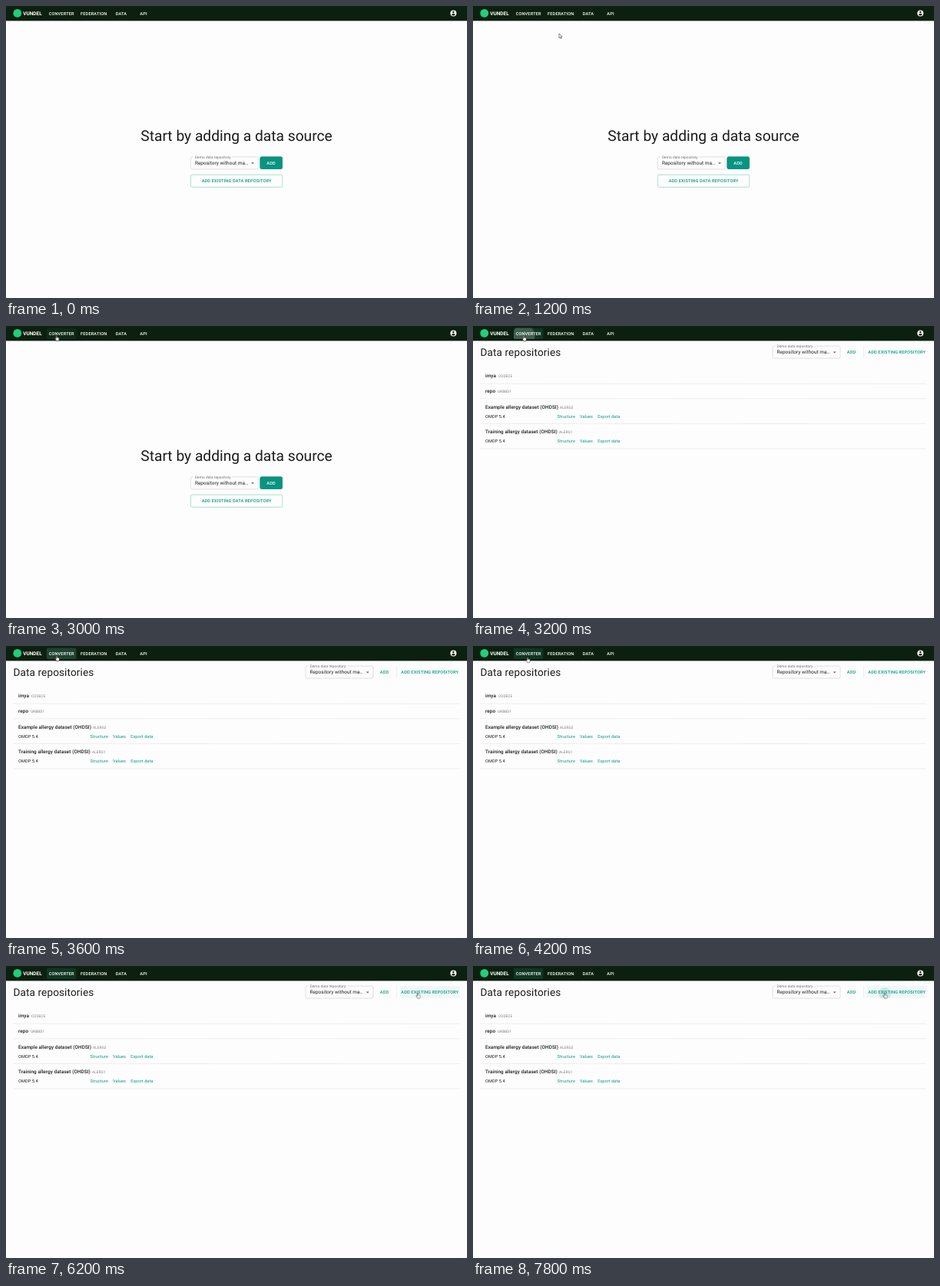
Animation, 600 px wide and 381 px high, one loop 8000 ms. Source, as an HTML page:

```html
<!DOCTYPE html>
<html lang="en">
<head>
<meta charset="utf-8">
<title>Data repositories</title>
<style>
  html, body { margin: 0; width: 100%; height: 100%; overflow: hidden; background: #fdfdfd; }
  svg { display: block; width: 100vw; height: 100vh; }
  text { font: 400 5.6px Roboto, sans-serif; fill: #1c1c1c; letter-spacing: .01071em; text-rendering: geometricPrecision; white-space: pre; }
  .btn { font-weight: 500; letter-spacing: .02857em; text-anchor: middle; }
  .white { fill: #fff; }
  .teal { fill: #079a82; }
  .brand { font-size: 6.5px; font-weight: 700; letter-spacing: 0; }
  .h3 { font-size: 19.2px; letter-spacing: 0; text-anchor: middle; }
  .h4 { font-size: 13.6px; letter-spacing: .00735em; }
  .value { font-size: 6.4px; letter-spacing: .00938em; }
  .label { font-size: 4.8px; letter-spacing: .00938em; fill: #6b6b6b; }
  .name { font-size: 6.4px; font-weight: 500; letter-spacing: .00938em; }
  .code { font-size: 4.8px; letter-spacing: 0; fill: #7c7c7c; }
  .raised { filter: drop-shadow(0 .6px .7px rgba(0, 60, 50, .45)); }
</style>
</head>
<body>
<svg viewBox="0 0 600 381" preserveAspectRatio="none">
  <defs>
    <clipPath id="navClip"><rect x="53" y="2.6" width="38.4" height="14.4" rx="1.8"/></clipPath>
    <clipPath id="addClip"><rect x="512.6" y="26" width="78.2" height="16" rx="1.8"/></clipPath>
    <g id="select">
      <path d="M244 196.9H242.3Q240.3 196.9 240.3 198.9V210.9Q240.3 212.9 242.3 212.9H326.3Q328.3 212.9 328.3 210.9V198.9Q328.3 196.9 326.3 196.9H294"
        fill="none" stroke="#c2c2c2" stroke-width=".5"/>
      <text class="label" x="245.9" y="198.6">Demo data repository</text>
      <text class="value" x="245.9" y="207.2">Repository without ma…</text>
      <path d="M319 204.2h4l-2 2z" fill="#666"/>
    </g>
  </defs>
  <rect width="600" height="381" fill="#fdfdfd"/>

  <g id="start">
    <text class="h3" x="300" y="175.7">Start by adding a data source</text>
    <use href="#select"/>
    <rect class="raised" x="330.5" y="196.6" width="29.4" height="16.4" rx="2.4" fill="#079480"/>
    <text class="btn white" x="345.1" y="207">ADD</text>
    <rect x="240.4" y="220.2" width="119.4" height="16.2" rx="2.2" fill="none" stroke="#74ccb8" stroke-width=".6"/>
    <text class="btn teal" x="300.1" y="230.3">ADD EXISTING DATA REPOSITORY</text>
  </g>

  <g id="list" opacity="0">
    <text class="h4" x="9.5" y="38.8">Data repositories</text>
    <use href="#select" x="149.6" y="-170.8"/>
    <text class="btn teal" x="492.6" y="36.1">ADD</text>
    <path d="M508.7 26v16" stroke="#dedede" stroke-width=".5"/>
    <g clip-path="url(#addClip)">
      <rect id="addHover" x="512" y="26" width="79" height="16" fill="#079480" opacity="0"/>
      <circle id="addRipple" cx="536" cy="36" r="0" fill="#079480" opacity="0"/>
    </g>
    <text class="btn teal" x="551.7" y="36.1">ADD EXISTING REPOSITORY</text>
    <g id="rows"></g>
  </g>

  <rect width="600" height="19.4" fill="#0c200f"/>
  <circle cx="14.8" cy="9.4" r="5.4" fill="#22cf78"/>
  <text class="brand white" x="22.2" y="11.8">VUNDEL</text>
  <g clip-path="url(#navClip)">
    <rect id="navHover" x="53" y="2" width="39" height="16" fill="#1e6a54" opacity="0"/>
    <circle id="navRipple" cx="66" cy="13" r="0" fill="#fff" opacity="0"/>
  </g>
  <g id="nav"></g>
  <circle cx="582.3" cy="9.6" r="4" fill="#fff"/>
  <circle cx="582.3" cy="8" r="1.2" fill="#0c200f"/>
  <path d="M579.9 11.2Q580.1 10 582.3 10T584.7 11.2Q583.9 12.5 582.3 12.5T579.9 11.2Z" fill="#0c200f"/>

  <g id="cursor" opacity="0" fill="#fff" stroke="#111" stroke-width=".5" stroke-linejoin="round">
    <path id="arrow" d="M0 0V5.8L1.4 4.6L2.3 6.6L3.2 6.2L2.3 4.2H4.1Z"/>
    <path id="hand" d="M-.6 .5Q-.6 -.1 0 -.1T.6 .5V2.4Q1.1 2 1.6 2.5Q2.2 2.2 2.6 2.8Q3.4 2.6 3.4 3.5V4.6Q3.3 5.6 2.8 6.2V6.8H-.2V6.2Q-1 5.2 -2 3.8Q-2 3 -1.2 3.3L-.6 3.9Z"/>
  </g>
</svg>
<script>
const LOOP = 8000;
const $ = id => document.getElementById(id);

function add(parent, tag, attrs, text = '') {
  const el = document.createElementNS('http://www.w3.org/2000/svg', tag);
  for (const key in attrs) el.setAttribute(key, attrs[key]);
  el.textContent = text;
  parent.append(el);
}

[['CONVERTER', 72.2], ['FEDERATION', 114.2], ['DATA', 149.9], ['API', 179]]
  .forEach(([label, x]) => add($('nav'), 'text', { class: 'btn white', x, y: 11.8 }, label));

const repos = [
  ['imya', 'CODECE', 33, 67.4, 75.3],
  ['repo', 'UKBBS1', 32.2, 87.2, 94.8],
  ['Example allergy dataset (OHDSI)', 'ALERG2', 113, 107.6, 127.4, true],
  ['Training allergy dataset (OHDSI)', 'ALERG1', 112, 140.3, 160, true],
];
const links = [['Structure', 109.6], ['Values', 138.9], ['Export data', 162.2]];

for (const [name, code, codeX, y, lineY, full] of repos) {
  const rows = $('rows');
  add(rows, 'text', { class: 'name', x: 16, y }, name);
  add(rows, 'text', { class: 'code', x: codeX, y: y - .1 }, code);
  add(rows, 'path', { d: `M9.6 ${lineY}H590.4`, stroke: '#dedede', 'stroke-width': .5 });
  if (!full) continue;
  add(rows, 'text', { x: 16, y: y + 12 }, 'OMOP 5.4');
  for (const [label, x] of links) add(rows, 'text', { class: 'teal', x, y: y + 12 }, label);
}

// Each row is [ms, ...values], held until the next row.
function play(id, rows, style) {
  const frames = rows.map(([ms, ...v]) => ({ offset: ms / LOOP, easing: 'step-end', ...style(...v) }));
  frames.push({ ...frames[frames.length - 1], offset: 1 });
  $(id).animate(frames, { duration: LOOP, iterations: Infinity }).startTime = 0;
}
const fade = opacity => ({ opacity });
const ripple = (r, opacity) => ({ r: r + 'px', opacity });

play('start', [[0, 1], [3200, 0]], fade);
play('list', [[0, 0], [3200, 1]], fade);
play('navHover', [[0, 0], [2000, .15], [3200, .3]], fade);
play('navRipple', [[0, 0, 0], [3200, 14.5, .2], [3400, 28, .16], [3600, 30, .07], [3800, 30, 0]], ripple);
play('addHover', [[0, 0], [6000, .03], [6200, .05]], fade);
play('addRipple', [[0, 0, 0], [7600, 3.5, .12], [7800, 8, .16]], ripple);

play('cursor', [
  [0, 150, 52, 0], [1000, 150, 52], [1200, 112, 36], [1400, 84, 22], [1600, 68, 14], [1800, 66, 13],
  [2200, 65.6, 12.6], [3200, 66, 12.8],
  [4000, 68, 13.4], [4200, 71, 14.8], [4400, 75, 18], [4600, 82, 23],
  [5200, 150, 42], [5400, 275, 58], [5600, 410, 56], [5800, 505, 44], [6000, 533, 36.5], [6200, 535.8, 35.4],
], (x, y, opacity = 1) => ({ transform: `translate(${x}px, ${y}px)`, opacity }));
const handOn = [[0, 0], [1600, 1], [4400, 0], [6000, 1]];
play('hand', handOn, fade);
play('arrow', handOn, on => fade(1 - on));
</script>
</body>
</html>
```
